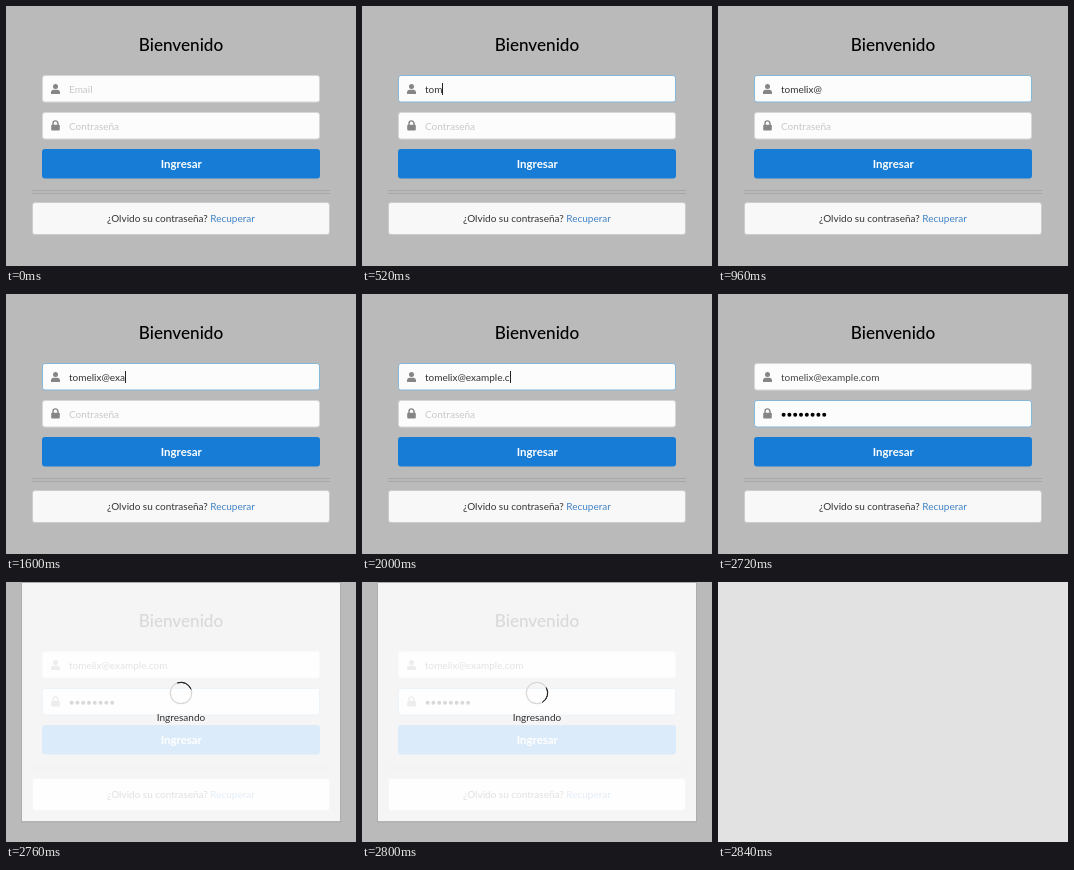
These frames come from a looping animation (350 by 260 pixels, 2880 ms). An HTML page:

```html
<!DOCTYPE html>
<html lang="es">
<head>
<meta charset="utf-8">
<title>Bienvenido</title>
<style>
  html, body { margin: 0; width: 100%; height: 100%; overflow: hidden; background: #bababa; }
  svg { display: block; width: 350px; height: 260px; font: 10px Lato, sans-serif; }
  .centered { text-anchor: middle; }
  .field { fill: #fcfcfc; }
  .icon { fill: #858585; }
  .caret { fill: #222; }
</style>
</head>
<body>
<svg viewBox="0 0 350 260">
  <rect width="350" height="260" fill="#bababa"/>
  <text class="centered" x="175" y="45" font-size="17.14" font-weight="500">Bienvenido</text>

  <rect id="emailBox" class="field" x="36.5" y="69.5" width="277" height="26.5" rx="2.5"/>
  <g class="icon">
    <circle cx="49.5" cy="80.4" r="2.5"/>
    <path d="M45 88v-1.4q0-2.9 2.9-2.9h3.2q2.9 0 2.9 2.9V88z"/>
  </g>
  <text id="email" x="63" y="86.6"></text>

  <rect id="passwordBox" class="field" x="36.5" y="106.5" width="277" height="26.5" rx="2.5"/>
  <g class="icon">
    <rect x="45.2" y="118.8" width="8.6" height="5.8" rx="1"/>
    <path d="M47 119v-1.6a2.5 2.5 0 0 1 5 0v1.6" fill="none" stroke="#858585" stroke-width="1.4"/>
  </g>
  <text id="placeholder" x="63" y="123.6">Contraseña</text>
  <g id="dots"></g>
  <rect id="caret" class="caret" width="1" height="12"/>

  <rect x="36" y="143" width="278" height="29.5" rx="3" fill="#167cd5"/>
  <text class="centered" x="175.3" y="162" font-size="11.43" font-weight="700" fill="#fff">Ingresar</text>

  <path d="M26 184.5H324M26 187.5H324" stroke="#a8a8a8"/>
  <rect x="26.5" y="196.5" width="297" height="32" rx="2.5" fill="#f8f8f8" stroke="#cbcccc"/>
  <text class="centered" x="175" y="216" fill="#333">¿Olvido su contraseña? <tspan fill="#4183c4">Recuperar</tspan></text>

  <g id="dimmer">
    <rect x="15.5" y=".5" width="319" height="239.5" fill="none" stroke="#adadad"/>
    <rect x="16" y="1" width="318" height="238" fill="#fff" fill-opacity=".85"/>
    <circle cx="175" cy="111" r="10.7" fill="none" stroke="#d8d8d8" stroke-width="1.2"/>
    <path id="spinner" d="M167.4 103.4A10.7 10.7 0 0 1 182.6 103.4Q175 97.4 167.4 103.4z" fill="#222" stroke="#222" stroke-width=".8"/>
    <text class="centered" x="175" y="139" fill="#333">Ingresando</text>
  </g>
  <rect id="blank" width="350" height="260" fill="#e2e2e2"/>
</svg>
<script>
const LOOP = 2880, STEP = 40;
const ADDRESS = "tomelix@example.com";
const KEY_TIMES = [400, 440, 520, 560, 640, 680, 760, 800, 1080, 1440,
                   1600, 1680, 1720, 1800, 1840, 1920, 2000, 2080, 2120];
const CARET_SPANS = [[80, 240], [400, 960], [1080, 1240], [1400, 2200], [2240, 2720]];
const PASSWORD_STEPS = [[2400, 1], [2520, 4], [2560, 8]];
const DOT_PITCH = 5.8;

const $ = id => document.getElementById(id);
const ramp = (t, start, end) => Math.min(1, Math.max(0, (t - start) / (end - start)));
const show = (id, visible) => $(id).setAttribute("visibility", visible ? "visible" : "hidden");
const paint = (id, color) => $(id).setAttribute("fill", color);

function mix(from, to, k) {
  return `rgb(${from.map((v, i) => Math.round(v + (to[i] - v) * k))})`;
}
const borderColor = focus => mix([215, 215, 215], [133, 183, 217], focus);
const hintColor = focus => mix([200, 200, 200], [145, 145, 145], focus);

for (let i = 0; i < 8; i++) {
  const dot = document.createElementNS("http://www.w3.org/2000/svg", "circle");
  dot.setAttribute("cx", 65.6 + i * DOT_PITCH);
  dot.setAttribute("cy", 120.8);
  dot.setAttribute("r", 2);
  $("dots").append(dot);
}

function draw(t) {
  const emailFocus = ramp(t, 0, 120) * (1 - ramp(t, 2160, 2240));
  const passwordFocus = ramp(t, 2160, 2240);
  const typed = KEY_TIMES.filter(time => time <= t).length;
  const dotCount = PASSWORD_STEPS.reduce((n, [time, count]) => t >= time ? count : n, 0);

  $("emailBox").setAttribute("stroke", borderColor(emailFocus));
  $("passwordBox").setAttribute("stroke", borderColor(passwordFocus));

  $("email").textContent = typed ? ADDRESS.slice(0, typed) : "Email";
  paint("email", !typed ? hintColor(emailFocus) : t < 2200 ? "#333" : "#444");
  paint("placeholder", hintColor(passwordFocus));
  show("placeholder", !dotCount);
  [...$("dots").children].forEach((dot, i) => dot.setAttribute("visibility", i < dotCount ? "visible" : "hidden"));

  const inPassword = t >= 2200;
  const width = inPassword ? dotCount * DOT_PITCH : typed ? $("email").getComputedTextLength() : 0;
  $("caret").setAttribute("x", Math.round(63 + width));
  $("caret").setAttribute("y", inPassword ? 114 : 77);
  show("caret", CARET_SPANS.some(([on, off]) => t >= on && t < off));

  show("dimmer", t >= 2760);
  $("spinner").setAttribute("transform", `rotate(${25 + (t - 2760) * 2} 175 111)`);
  show("blank", t >= 2840);
}

function tick() {
  const t = performance.now() % LOOP;
  draw(Math.floor(t / STEP) * STEP);
  requestAnimationFrame(tick);
}
tick();
</script>
</body>
</html>
```
